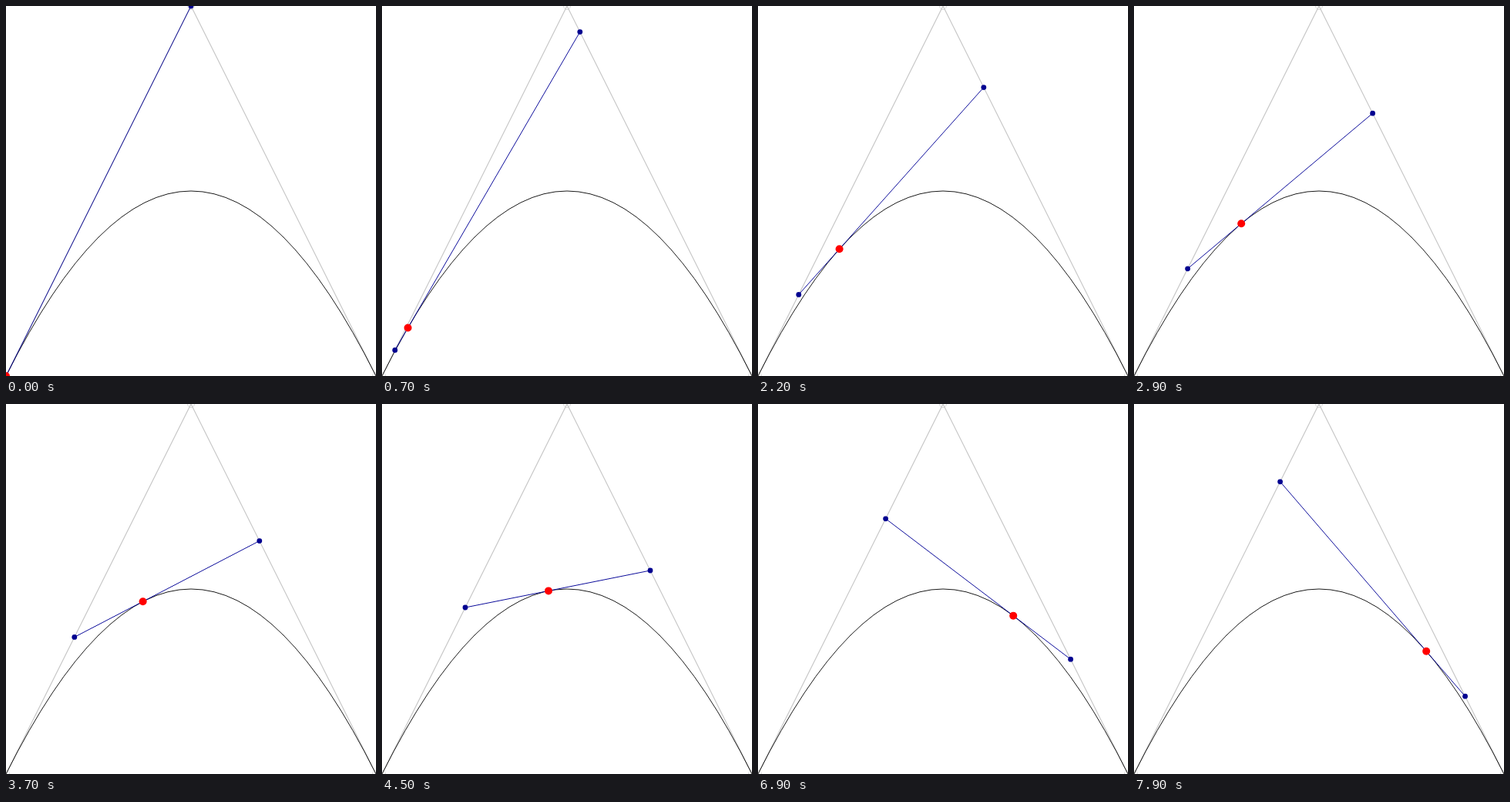
An HTML page that plays this animation: 480x480 px, repeating every 8 s.

```html
<!DOCTYPE html>
<html lang="en">
<head>
<meta charset="utf-8">
<title>Quadratic curve construction</title>
<style>
  html, body { margin: 0; width: 100%; height: 100%; overflow: hidden; background: #fff; }
  svg { display: block; width: 480px; height: 480px; }
  .frame { fill: none; stroke: #c8c8c8; stroke-width: 1.2; }
  .knot { fill: none; stroke: #ccc; stroke-width: .7; }
  .curve { fill: none; stroke: #000; stroke-width: .9; }
  .chord { stroke: #000096; stroke-width: .95; }
  .joint { fill: #000090; }
  .pen { fill: #f00; }
</style>
</head>
<body>
<svg viewBox="0 0 480 480">
  <path class="frame" d="M0 480L240 0L480 480"/>
  <circle class="knot" cx="0" cy="480" r="4.5"/>
  <circle class="knot" cx="240" cy="0" r="4.5"/>
  <circle class="knot" cx="480" cy="480" r="4.5"/>
  <path class="curve" d="M0 480Q240 0 480 480"/>
  <line class="chord" id="chord"/>
  <circle class="joint" id="left" r="3.4"/>
  <circle class="joint" id="right" r="3.4"/>
  <circle class="pen" id="pen" r="5"/>
</svg>
<script>
  const LOOP = 8000, STEP = 100, SWEEP = 10000;
  const start = [0, 480], peak = [240, 0], end = [480, 480];
  const el = id => document.getElementById(id);
  const chord = el('chord'), left = el('left'), right = el('right'), pen = el('pen');

  const mix = (a, b, t) => a.map((v, i) => v + (b[i] - v) * t);

  function set(node, attrs) {
    for (const key in attrs) node.setAttribute(key, attrs[key]);
  }

  function place(dot, [cx, cy]) {
    set(dot, { cx, cy });
  }

  function draw(ms) {
    const t = Math.floor((ms % LOOP) / STEP) * STEP / SWEEP;
    const a = mix(start, peak, t), b = mix(peak, end, t);
    set(chord, { x1: a[0], y1: a[1], x2: b[0], y2: b[1] });
    place(left, a);
    place(right, b);
    place(pen, mix(a, b, t));
  }

  const began = performance.now();
  function tick() {
    draw(performance.now() - began);
    requestAnimationFrame(tick);
  }
  tick();
</script>
</body>
</html>
```
